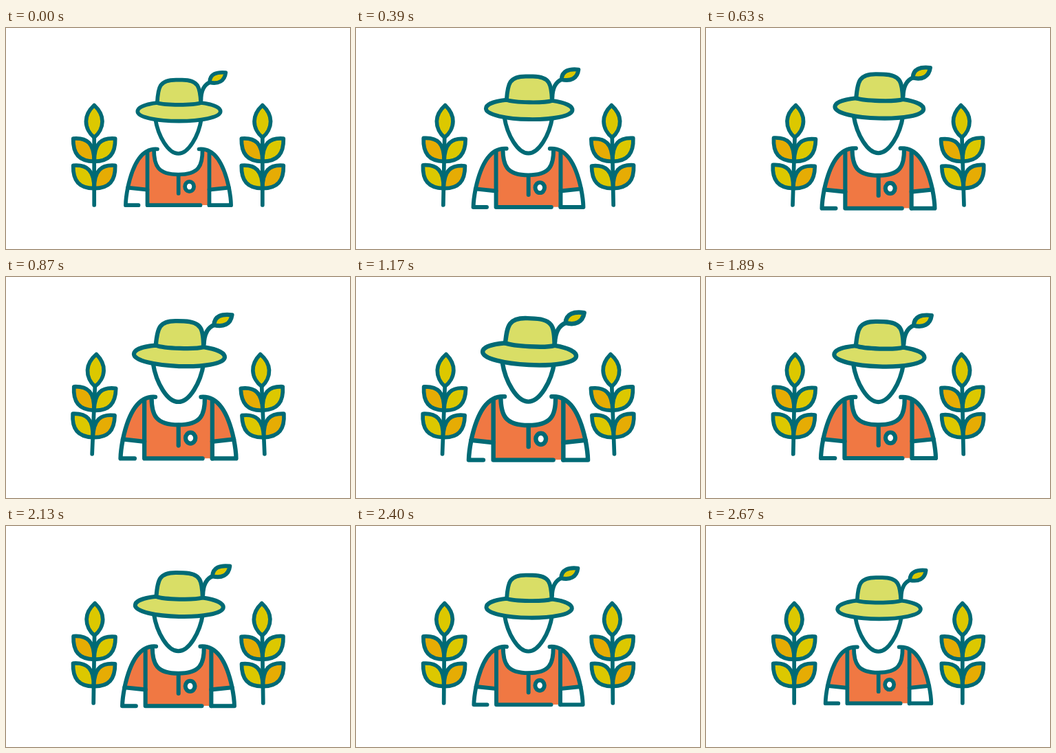
Recreate the animation shown at these times as an HTML page. Size 500 by 322 pixels, loop 2700 ms.

```html
<!DOCTYPE html>
<html lang="en">
<head>
<meta charset="utf-8">
<title>Farmer</title>
<style>
html, body { margin: 0; width: 100%; height: 100%; overflow: hidden; background: #fff; }
svg { display: block; width: 100vw; height: 100vh; }
.ink { stroke: #006a75; stroke-width: 5.7; stroke-linecap: round; stroke-linejoin: round; fill: none; }
.lime { fill: #d9de66; }
.coral { fill: #f07843; stroke: none; }
.gold { fill: #dcc800; }
.amber { fill: #e6ac04; }
.white { fill: #fff; }
</style>
</head>
<body>
<svg viewBox="0 0 500 322">
  <defs>
    <path id="leaf" d="M-30.5 -33.3 C-10 -35 0 -26 0 0 C-22 0 -31 -11 -30.5 -33.3Z"/>
    <g id="wheat" class="ink">
      <path d="M0 -28 V72"/>
      <path class="gold" d="M0 -73.500 C-7 -67 -11.800 -58 -11.800 -50 C-11.800 -41 -7 -32 0 -26.500 C7 -32 11.800 -41 11.800 -50 C11.800 -58 7 -67 0 -73.500Z"/>
      <use href="#leaf" class="amber" y="8.3"/>
      <use href="#leaf" class="gold" y="8.3" transform="scale(-1 1)"/>
      <use href="#leaf" class="gold" y="47.7"/>
      <use href="#leaf" class="amber" y="47.7" transform="scale(-1 1)"/>
    </g>
  </defs>
  <use id="left" href="#wheat"/>
  <use id="right" href="#wheat"/>
  <g id="farmer" class="ink">
    <path class="coral" d="M215 176.500 C194 177 183 203 177 232.700 L205.500 235.500 V258 H294 L295.500 235.500 L324 232.700 C318 203 307 177 285.500 176.500 C286 200 281 213.500 250.500 213.500 C220 213.500 215 200 215 176.500Z"/>
    <path d="M220 176.500 C197 174.500 184 200 177 232.700 C175 243 174 251 173.900 258.200 H192.500"/>
    <path d="M280.500 176.500 C304 174.500 317 200 324 232.700 C326 243 327 251 327.100 258.200 H295.500"/>
    <path d="M205.500 181 V258.200 H282.500"/>
    <path d="M295.500 181 V258.200"/>
    <path d="M177 232.700 L205.500 235.700 M324 232.700 L295.500 235.700"/>
    <path d="M215 177 C215 201 221 213.500 250.500 213.500 C280 213.500 286 201 285.500 177"/>
    <path d="M250.700 214 V241"/>
    <ellipse class="white" cx="266.600" cy="231" rx="6.500" ry="7.200"/>
    <path class="white" d="M217 132 C221 158 236 183 250.500 183 C265 183 280 158 284 132"/>
    <g id="hat">
      <path d="M283.500 105 C283.500 92 287 83 296.500 79"/>
      <path class="gold" d="M296 79.300 C296 67 306 63.800 319.300 65 C318 77.500 308.500 82 296 79.300Z"/>
      <path class="lime" d="M219.500 109 C203 111 191.300 115.500 191.300 121.500 C191.300 130.500 221 135.600 251.500 135.600 C282 135.600 311.700 130.500 311.700 121.500 C311.700 115.500 300 111 283.500 109Z"/>
      <path class="lime" d="M219.800 109 C221 86 223 75.600 247 75.600 H256 C280 75.600 282 86 283.200 109 C272 112.800 231 112.800 219.800 109Z"/>
    </g>
  </g>
</svg>
<script>
const LOOP = 2700, STEP = 30;
const el = id => document.getElementById(id);
const set = (id, value) => el(id).setAttribute('transform', value);

// Linear rise to 1 at the peak, then linear return to 0.
const ramp = (t, peak) => t < peak ? t / peak : (LOOP - t) / (LOOP - peak);

function draw(ms) {
  const t = Math.floor((ms % LOOP) / STEP) * STEP;
  const grow = ramp(t, LOOP / 2);
  const sway = 2.5 * ramp(t, LOOP / 3);
  set('farmer', `translate(250.5 193.6) scale(${1 + 0.15 * grow}) translate(-250.5 -193.6)`);
  set('hat', `rotate(${3.2 * grow} 251 130)`);
  set('left', `translate(128.2 186) rotate(${sway})`);
  set('right', `translate(372.8 186) rotate(${-sway})`);
}

const start = performance.now();
function tick() {
  draw(performance.now() - start);
  requestAnimationFrame(tick);
}
draw(0);
requestAnimationFrame(tick);
</script>
</body>
</html>
```
